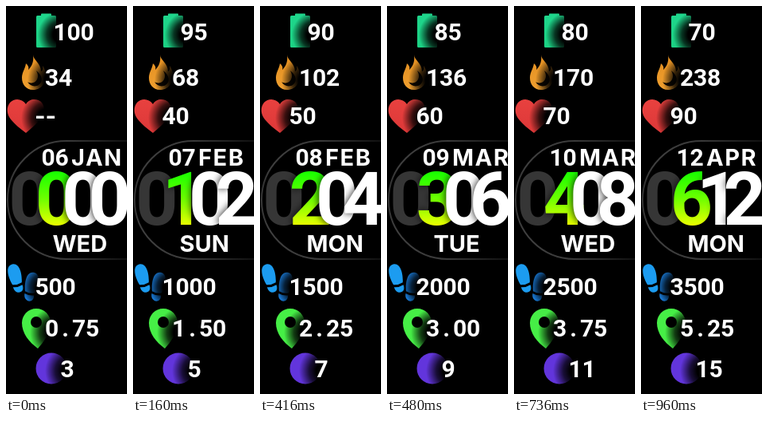
These frames come from a looping animation (152 px wide and 486 px high, 1120 ms). An HTML page with a canvas:

```html
<!DOCTYPE html>
<html lang="en">
<head>
<meta charset="utf-8">
<title>Watch face</title>
<style>
  html, body { margin: 0; width: 100%; height: 100%; overflow: hidden; background: #000; }
  canvas { display: block; width: 152px; height: 486px; }
</style>
</head>
<body>
<canvas id="face" width="152" height="486"></canvas>
<script>
const ctx = document.getElementById('face').getContext('2d');
const STEP = 160, STEPS = 7;
const DIGITS = '700 30px Roboto, sans-serif';
const LETTERS = '700 29px Inter, sans-serif';
const CLOCK = '700 93px Roboto, sans-serif';
const CELL = 17;
const MONTHS = ['JAN', 'FEB', 'FEB', 'MAR', 'MAR', 'APR', 'APR'];
const DAYS = ['WED', 'SUN', 'MON', 'TUE', 'WED', 'SUN', 'MON'];
const SOLE = new Path2D('M-6 8C-9 -1 -10 -17 0 -17C10 -17 9 -1 6 8Q0 10 -6 8Z');
const HEEL = new Path2D('M-6 11Q0 13 6 11C8 22 -6 22 -6 11Z');
const pad = n => String(n).padStart(2, '0');

function gradient(x0, y0, x1, y1, ...colors) {
  const g = ctx.createLinearGradient(x0, y0, x1, y1);
  colors.forEach((c, i) => g.addColorStop(i / (colors.length - 1), c));
  return g;
}

function fill(path, style) {
  ctx.fillStyle = style;
  ctx.fill(path);
}

// Soft black falloff behind a value, darkening the icon beside it.
function shade(x, y, r) {
  const g = ctx.createRadialGradient(x, y, r * 0.35, x, y, r);
  g.addColorStop(0, 'rgba(0,0,0,1)');
  g.addColorStop(0.4, 'rgba(0,0,0,0.75)');
  g.addColorStop(1, 'rgba(0,0,0,0)');
  ctx.fillStyle = g;
  ctx.fillRect(x - r, y - r, 2 * r, 2 * r);
}

function disc(x, y, r) {
  const p = new Path2D();
  p.arc(x, y, r, 0, 2 * Math.PI);
  return p;
}

function drawBattery() {
  const p = new Path2D();
  p.roundRect(44, 9.5, 13, 6, 1);
  p.roundRect(38, 12, 25, 40, 1.5);
  fill(p, gradient(0, 9, 0, 52, '#1fd68c', '#1bd183'));
  shade(69, 36, 29);
}

function drawFlame() {
  fill(new Path2D('M34 61C34 67 44 72 44 82C46 81 47 78 46 75C51 81 52 92 47 98C43 104 38 105 34 105C25 105 20 98 20 90C20 83 24 79 25 72C28 74 29 77 28 80C33 75 35 69 34 61Z'),
    gradient(0, 61, 0, 106, '#e28e20', '#f0a030'));
  fill(new Path2D('M38 81C46 87 47 95 41 99C36 102 30 100 27 95C32 98 37 96 39 92C41 88 40 85 38 81Z'), '#140b02');
  shade(60, 93, 33);
}

function drawHeart() {
  fill(new Path2D('M25 123C30 115 40 116 45 121C50 128 48 136 43 142C38 148 32 153 25 159C18 154 11 148 6 142C1 136 0 127 5 121C11 115 20 116 25 123Z'),
    gradient(0, 117, 0, 159, '#e8413f', '#dd3838'));
  shade(51, 140, 32);
}

function drawFoot(x, y, turn, color) {
  ctx.save();
  ctx.translate(x, y);
  ctx.rotate(turn);
  fill(SOLE, color);
  fill(HEEL, color);
  ctx.restore();
}

function drawSteps() {
  drawFoot(12, 340, -0.25, '#1c9cf0');
  drawFoot(31.5, 350.5, 0.2, '#1a80e2');
  shade(47, 352, 27);
}

function drawPin() {
  fill(new Path2D('M38 379C48 379 56 387 56 397C56 409 48 420 40 429C29 421 20 410 20 397C20 387 28 379 38 379Z'), '#46ee46');
  shade(62, 409, 32);
  fill(disc(38, 396, 7), '#000');
}

function drawBadge() {
  fill(disc(57, 454, 19.5), '#6235dc');
  shade(82, 457, 33);
}

function drawRing() {
  ctx.beginPath();
  ctx.moveTo(152, 169);
  ctx.lineTo(76, 169);
  ctx.arc(76, 243, 74, -Math.PI / 2, Math.PI / 2, true);
  ctx.lineTo(152, 317);
  ctx.lineWidth = 2;
  ctx.strokeStyle = gradient(2, 0, 152, 0, '#404040', '#3a3a3a', '#101010');
  ctx.stroke();
}

function digits(text, x, y) {
  ctx.font = DIGITS;
  ctx.textAlign = 'center';
  ctx.fillStyle = '#fff';
  [...String(text)].forEach((c, i) => ctx.fillText(c, x + CELL * (i + 0.5), y));
}

function letters(text, x, y, spacing = 0) {
  ctx.save();
  ctx.font = LETTERS;
  ctx.letterSpacing = spacing + 'px';
  ctx.textAlign = 'left';
  ctx.fillStyle = '#fff';
  ctx.fillText(text, x, y);
  ctx.restore();
}

function drawClock(time) {
  const styles = ['#363636', gradient(0, 208, 0, 274, '#18ff00', '#6cff00', '#e6ff00'), '#fff', '#fff'];
  ctx.save();
  ctx.font = CLOCK;
  ctx.textAlign = 'center';
  ctx.shadowColor = 'rgba(0,0,0,0.8)';
  ctx.shadowBlur = 10;
  ctx.shadowOffsetX = -1;
  [...time].forEach((c, i) => {
    ctx.fillStyle = styles[i];
    ctx.fillText(c, 30 + 33.4 * i, 274);
  });
  ctx.restore();
}

function draw(i) {
  ctx.fillStyle = '#000';
  ctx.fillRect(0, 0, 152, 486);
  drawRing();
  drawBattery();
  drawFlame();
  drawHeart();
  drawSteps();
  drawPin();
  drawBadge();

  digits(100 - 5 * i, 59.5, 42.7);
  digits(34 * (i + 1), 49, 99.7);
  if (i) digits(30 + 10 * i, 36.5, 147.7);
  else letters('--', 36, 147.7);

  digits(pad(6 + i), 44.5, 199.7);
  letters(MONTHS[i], 82, 199.7, 1.5);
  drawClock(pad(i) + pad(2 * i));
  letters(DAYS[i], 58.5, 307.7);

  digits(500 * (i + 1), 36.5, 361.7);
  digits((0.75 * (i + 1)).toFixed(2), 49, 414);
  digits(3 + 2 * i, 68.5, 464.7);
}

function tick() {
  draw(Math.floor(performance.now() / STEP) % STEPS);
  requestAnimationFrame(tick);
}
tick();
</script>
</body>
</html>
```
